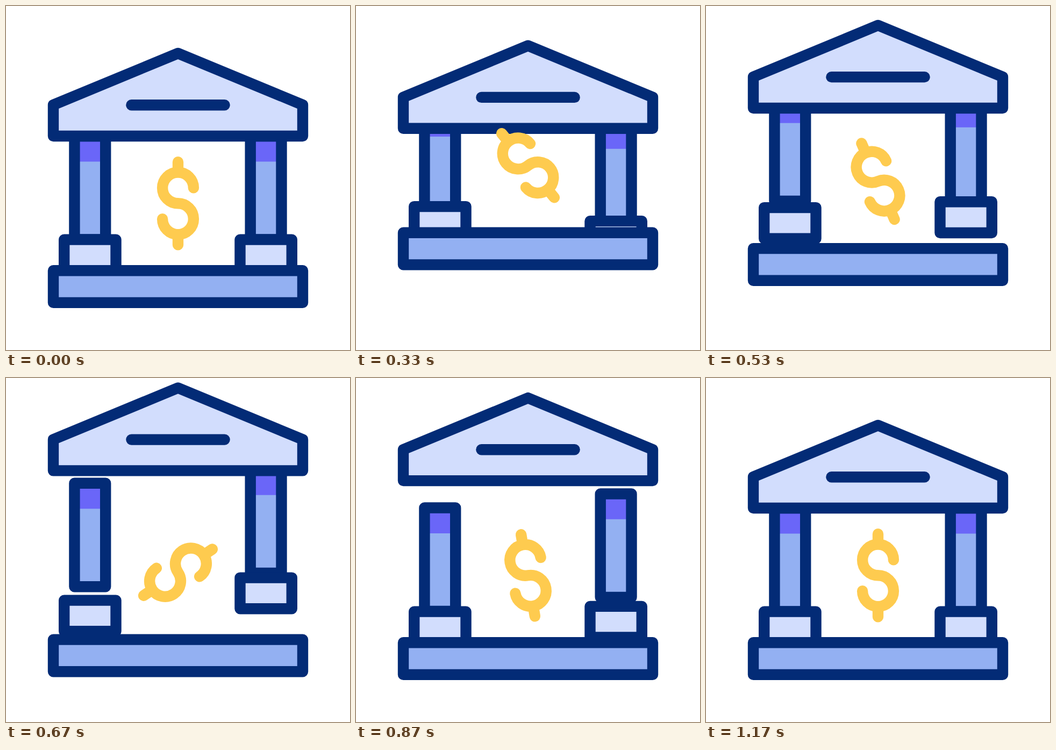
An HTML page that plays this animation: 640x640 px, repeating every 1670 ms.

```html
<!DOCTYPE html>
<html lang="en">
<head>
<meta charset="utf-8">
<title>Bank</title>
<style>
  html, body { margin: 0; height: 100%; overflow: hidden; background: #fff; }
  svg { display: block; width: 100vw; height: 100vh; }
  .line { stroke: #032b76; stroke-width: 20.4; stroke-linejoin: round; stroke-linecap: round; }
  .pale { fill: #d2ddfd; }
  .mid { fill: #93b0f2; }
  .cap { fill: #6a66f8; }
  #dollar { fill: none; stroke: #fecb4f; stroke-width: 20.4; stroke-linecap: round; }
</style>
</head>
<body>
<svg viewBox="0 0 640 640">
  <defs>
    <g id="column">
      <path class="mid" d="M127.4 242h57.8v192.5h-57.8z"/>
      <path class="cap" d="M127.4 242h57.8v47.4h-57.8z"/>
      <path class="line" fill="none" d="M127.4 242h57.8v192.5h-57.8z"/>
    </g>
    <path id="plinth" class="line pale" d="M108.2 434.6h96.3v57.7h-96.3z"/>
  </defs>
  <use id="leftColumn" href="#column"/>
  <use id="rightColumn" href="#column" x="327.3"/>
  <use id="leftPlinth" href="#plinth"/>
  <use id="rightPlinth" href="#plinth" x="327.3"/>
  <path id="base" class="line mid" d="M88 492.3h464v59.6h-464z"/>
  <g id="roof" class="line pale">
    <path d="M88 242h464v-58L320 88 88 184z"/>
    <path d="M233.4 184.2h173.2"/>
  </g>
  <path id="dollar" d="M348.9 338.4A28.9 28.9 0 1 0 320 367.3A28.9 28.9 0 1 1 291.1 396.2M320 290.2v19.3M320 425.1v19.3"/>
</svg>
<script>
  const LOOP = 1670, LAST_STEP = 35, STEP = 100 / 3, LIFT = 72;

  // start, peak and landing time of each part's hop, in ms
  const hops = {
    base: [0, 367, 733],
    leftPlinth: [33, 433, 800],
    leftColumn: [67, 516, 885],
    rightPlinth: [100, 580, 957],
    rightColumn: [133, 648, 1022],
    roof: [167, 733, 1100],
  };

  const ease = (t, from, to) => {
    const p = Math.min(1, Math.max(0, (t - from) / (to - from)));
    return (1 - Math.cos(Math.PI * p)) / 2;
  };
  const offset = (t, [start, peak, end]) =>
    -LIFT * (ease(t, start, peak) - ease(t, peak, end));
  const place = (id, transform) =>
    document.getElementById(id).setAttribute('transform', transform);

  function draw(now) {
    // 30 steps per second, each starting on a 10 ms tick
    const tick = Math.floor(now % LOOP / 10);
    const t = Math.min(LAST_STEP, Math.floor((tick + 0.5) * 0.3)) * STEP;

    for (const id in hops) place(id, `translate(0 ${offset(t, hops[id])})`);

    // wind up to the left, then half a turn to the right
    const angle = 225 * ease(t, 433, 933) - 45 * ease(t, 0, 433);
    place('dollar', `translate(0 ${offset(t, hops.base)}) rotate(${angle} 320 367.3)`);
    requestAnimationFrame(draw);
  }
  draw(performance.now());
</script>
</body>
</html>
```
